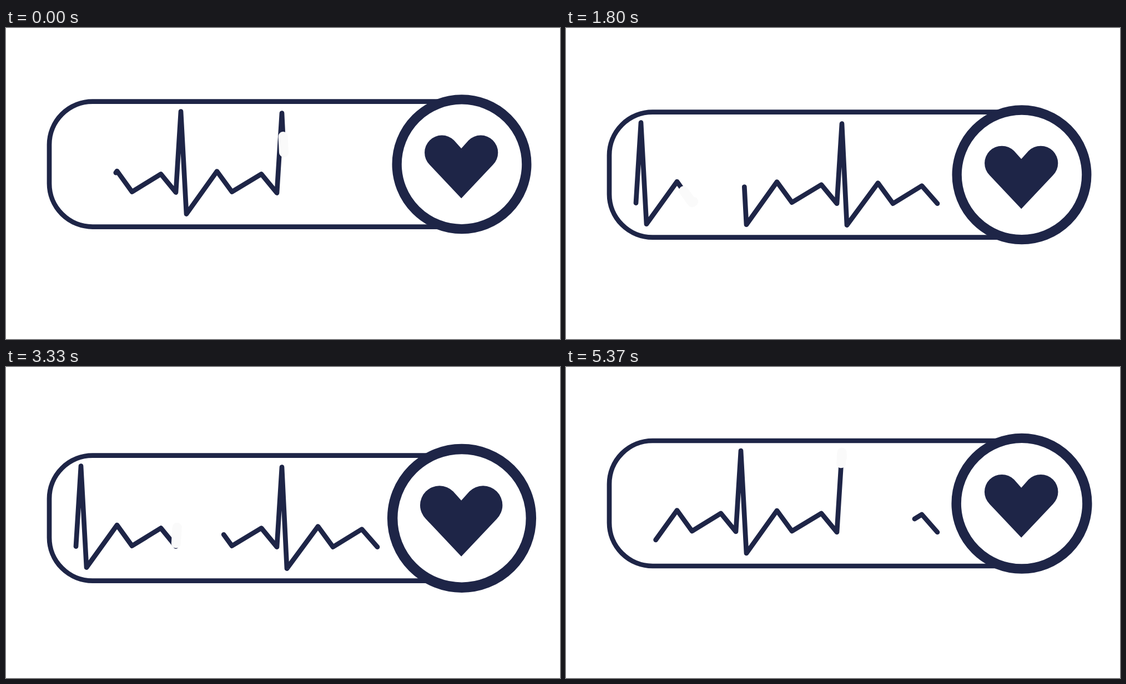
Animation of 998 by 561 pixels, one loop 5410 ms. Source, as an HTML page:

```html
<!DOCTYPE html>
<html lang="en">
<head>
<meta charset="utf-8">
<title>Heartbeat</title>
<style>
  html, body { margin: 0; width: 100%; height: 100%; overflow: hidden; background: #fff; }
  svg { display: block; width: 100vw; height: 100vh; }
  .line { fill: none; stroke: #1e2547; stroke-width: 8.7; stroke-linecap: round; stroke-linejoin: round; }
  .tip { fill: none; stroke: #fafafa; stroke-width: 17; stroke-linecap: round; stroke-linejoin: round; }
</style>
</head>
<body>
<svg viewBox="0 0 998 561">
  <g id="badge">
    <path class="line" d="M821 -113H156A78 78 0 0 0 78 -35V35A78 78 0 0 0 156 113H821"/>
    <g id="pulses"></g>
    <circle id="ring" cx="821" cy=".2" fill="#fff" stroke="#1e2547"/>
    <path id="heart" fill="#1e2547" d="M0 -28.5L-13 -43A31 31 0 0 0 -57 1L0 61.5L57 1A31 31 0 0 0 13 -43Z"/>
  </g>
</svg>
<script>
const LOOP = 5410, CYCLE = 81, BEAT = 27, BOB = 40.5;
const TRACE_LENGTH = 911, TIP_LENGTH = 29;
const ECG = "M126 51L135 -94L145 89L200 12.5L227 50L279 18L306 51L315 -95L325 90L380 13" +
  "L407 50L460 18L488 52L497 -92L506 91L562 15L589 52L641 20L669 52";

// Head position along the trace for each sweep: [step, distance]
const SWEEPS = [
  [[1.6, 0], [5, 110], [34, 1065], [54, 1747], [80, 2575], [81, 2637]],
  [[40.5, 0], [54, 436], [80, 1268], [81, 1330], [86, 1468], [115, 2426], [122, 2660]]
];

const $ = id => document.getElementById(id);
const badge = $("badge"), ring = $("ring"), heart = $("heart");

function addPath(className) {
  const path = document.createElementNS("http://www.w3.org/2000/svg", "path");
  path.setAttribute("class", className);
  path.setAttribute("d", ECG);
  $("pulses").append(path);
  return path;
}

const pulses = SWEEPS.map(keys => ({ keys, line: addPath("line"), tip: addPath("tip") }));
const total = pulses[0].line.getTotalLength();

function trim(path, from, to) {
  const start = Math.max(0, from), end = Math.min(total, to);
  path.style.display = end > start ? "" : "none";
  path.setAttribute("stroke-dasharray", `${Math.max(0, end - start)} 9999`);
  path.setAttribute("stroke-dashoffset", -start);
}

function interpolate(keys, x) {
  const i = keys.findIndex(key => key[0] >= x);
  if (i < 1) return null;
  const [x0, y0] = keys[i - 1], [x1, y1] = keys[i];
  return y0 + (y1 - y0) * (x - x0) / (x1 - x0);
}

// Steps last 30, 40 and 30 ms in turn
function stepAt(time) {
  const rest = time % 100;
  const part = rest < 30 ? 0 : rest < 70 ? 1 : 2;
  return Math.min(161, 3 * Math.floor(time / 100) + part);
}

function draw(time) {
  const step = stepAt(time) % CYCLE;
  const y = 259.4 - 14 * Math.cos(2 * Math.PI * (step - 0.9) / BOB);
  badge.setAttribute("transform", `translate(0 ${y})`);

  const phase = step % BEAT / BEAT;
  const swell = 1 - Math.abs(2 * phase - 1);
  const ringScale = 1 + swell * 14.5 / 125.5;
  ring.setAttribute("r", 116.85 * ringScale);
  ring.setAttribute("stroke-width", 17.3 * ringScale);
  const heartScale = 1 + 0.095 * (1 - Math.cos(2 * Math.PI * phase));
  heart.setAttribute("transform", `translate(820.2 .2) scale(${heartScale})`);

  for (const { keys, line, tip } of pulses) {
    const head = interpolate(keys, step) ?? interpolate(keys, step + CYCLE) ?? -100;
    trim(line, head - TRACE_LENGTH, head + 9);
    trim(tip, head + 7, head + 7 + TIP_LENGTH);
  }
}

function tick() {
  draw(performance.now() % LOOP);
  requestAnimationFrame(tick);
}
tick();
</script>
</body>
</html>
```
